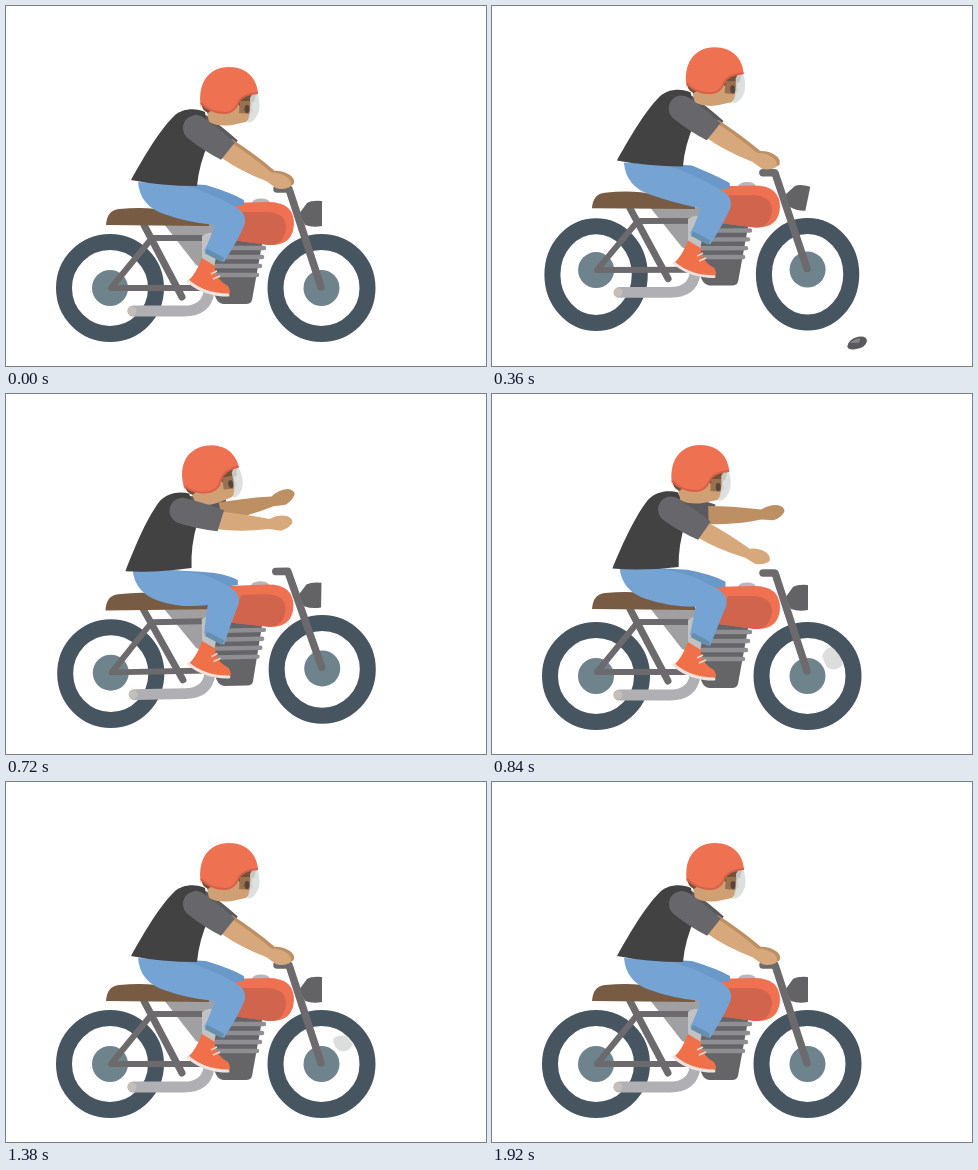
Write an HTML page that moves like this. It is 480 by 360 pixels and loops after 1.95 s.

```html
<!DOCTYPE html>
<html lang="en">
<head>
<meta charset="utf-8">
<title>Motorbike hop</title>
<style>
  html, body { margin: 0; width: 100%; height: 100%; overflow: hidden; background: #fff; }
  svg { display: block; width: 100vw; height: 100vh; }
</style>
</head>
<body>
<svg viewBox="0 0 480 360">
  <defs>
    <path id="forearm" d="M-3-9Q25-8 50-4Q58-9 67-8Q74-6 73-1Q69 5 62 7L50 6Q22 11-3 9Z"/>
    <path id="sleeve" d="M0-13Q22-13 40-11L39 11Q20 14 0 13A13 13 0 0 1 0-13Z"/>
  </defs>

  <g id="farArm">
    <use href="#sleeve" fill="#5a595e"/>
    <g class="fore" fill="#bd9064"><use href="#forearm"/></g>
  </g>

  <g id="glints" fill="#dcdddd">
    <path data-at="840" d="M330 262Q335 250 344 254Q352 263 350 272Q340 279 334 272Z"/>
    <path data-at="1050" d="M66 292Q90 309 116 317Q103 322 88 317Q70 309 66 292Z"/>
    <path data-at="1380" d="M327 257Q332 252 340 254L347 262Q343 271 334 269Q328 266 327 257Z"/>
  </g>

  <g id="wheels" fill="none" stroke="#475560" stroke-width="16"></g>

  <g id="bike">
    <path d="M158 218H214V270L190 259Z" fill="#a0a0a3"/>
    <path d="M127 305H178Q200 305 203 286" fill="none" stroke="#b0b0b4" stroke-width="11" stroke-linecap="round"/>
    <circle cx="126" cy="305" r="4.5" fill="#c5beb9"/>
    <path d="M206 233H257L246 294Q245 298 240 298H217Q210 297 208 286Z" fill="#656568"/>
    <path d="M206 242H258M207 251H256M208 260H254M209 269H251" stroke="#8f8f93" stroke-width="4.5" stroke-linecap="round"/>
    <g fill="none" stroke="#6c6a6d" stroke-linecap="round" stroke-linejoin="round">
      <path d="M200 282H105L146 232H212" stroke-width="6"/>
      <path d="M138 219L176 291" stroke-width="7"/>
    </g>
    <path d="M196 230Q208 222 213 234L208 262L196 254Z" fill="#c2c2c2"/>
    <path d="M100 219Q101 204 113 203Q142 200 162 205L203 213V220Z" fill="#775b43"/>
    <ellipse cx="255" cy="197" rx="9" ry="4.5" fill="#b7b7b7"/>
    <path d="M217 197L262 196Q288 196 288 218Q287 240 263 239L226 234Z" fill="#ef7151"/>
    <path d="M236 206H262Q280 207 280 222Q278 239 263 239L226 234Z" fill="#d0644d"/>
    <path id="lamp" fill="#636265" d="M293 208L301 197Q306 194 316 195V220Q307 222 299 219Z"/>
    <path d="M271 183H283L315 281" fill="none" stroke="#6c6a6d" stroke-width="7.5" stroke-linecap="round" stroke-linejoin="round"/>
  </g>

  <path id="farLeg" fill="#6a99c9"/>
  <path id="leg" fill="#75a4d4"/>
  <path id="cuff" fill="none" stroke="#668fae" stroke-width="5"/>
  <g id="shoe">
    <path d="M196 252L209 260Q208 272 222 280Q226 287 222 289Q212 291 200 286L182 275Q190 268 196 252Z" fill="#ef7049"/>
    <path d="M182 275Q198 289 222 289" fill="none" stroke="#eee3df" stroke-width="3" stroke-linecap="round"/>
    <path d="M205 268L211 265M207 273L214 270" stroke="#f7d9cd" stroke-width="1.5"/>
  </g>

  <g id="head">
    <path d="M198 92L203 116Q212 121 226 119L240 116Q245 112 244 107L247 105L243 88Z" fill="#d0a075"/>
    <path d="M195 95L206 104L202 107Q195 104 195 95Z" fill="#745239"/>
    <path d="M229 90Q242 84 250 88L248 96L233 100Z" fill="#745239"/>
    <path d="M234 95H246L244 108L233 107Z" fill="#997151"/>
    <ellipse cx="241" cy="103" rx="2.5" ry="4" fill="#58443b"/>
    <path d="M249 83Q255 92 253 105Q249 117 241 117Q245 105 244 92Z" fill="#d6dad9" opacity=".85"/>
    <path d="M195 102C191 78 202 61 223 61C241 61 251 73 252 87Q236 87 232 97Q230 107 219 108Q203 107 195 96Z" fill="#ee7151"/>
    <path d="M195 97Q204 107 219 107Q229 106 232 97Q236 88 252 87" fill="none" stroke="#d86149" stroke-width="2"/>
  </g>

  <path id="torso" fill="#424242" d="M125 174C135 156 152 126 168 110C177 102 190 102 199 106L203 136Q193 158 191 180Q155 180 125 174Z"/>

  <g id="nearArm">
    <g class="fore" fill="#d6a87c"><use href="#forearm"/></g>
    <use href="#sleeve" fill="#67666b"/>
  </g>

  <g id="rock">
    <path d="M-10 2Q-8-5 2-6Q11-6 10 0Q8 6-3 6Q-10 6-10 2Z" fill="#59585c"/>
    <path d="M-7-1Q-2-5 4-4L2 0Z" fill="#85838a"/>
  </g>
</svg>

<script>
const LOOP = 1950, STEP = 30;
const AXLE = { x: 104, y: 282 }, HIP = { x: 158, y: 177 };

const $ = id => document.getElementById(id);
const set = (el, attrs) => { for (const k in attrs) el.setAttribute(k, attrs[k]); };
const place = (el, x, y, a = 0, cx = 0, cy = 0) =>
  el.setAttribute("transform", `translate(${x} ${y}) rotate(${a} ${cx} ${cy})`);

const smooth = (t, from, to) => {
  const u = Math.min(1, Math.max(0, (t - from) / (to - from)));
  return u * u * (3 - 2 * u);
};
const pulse = (t, rise, full, fall, end) => smooth(t, rise, full) * (1 - smooth(t, fall, end));
// Ballistic arc from 0 up to 1 and back.
const arc = (t, from, to) => Math.max(0, 4 * (t - from) * (to - t) / (to - from) ** 2);

function turn(x, y, pivot, deg) {
  const a = deg * Math.PI / 180, c = Math.cos(a), s = Math.sin(a);
  const dx = x - pivot.x, dy = y - pivot.y;
  return [pivot.x + dx * c - dy * s, pivot.y + dx * s + dy * c];
}

function poseAt(t) {
  const air = arc(t, 215, 740);
  const wheelie = pulse(t, 330, 580, 610, 800);
  const rebound = 4 * pulse(t, 700, 820, 850, 1050);
  const back = pulse(t, 340, 580, 760, 1050);
  const reach = pulse(t, 380, 590, 600, 900);
  const farReach = pulse(t, 380, 590, 740, 1050);
  return {
    bikeX: 2 * wheelie, bikeY: -22.5 * air - rebound, tilt: -3 * wheelie,
    hang: rebound, stretch: 1.45 * air, squash: 1 - 0.025 * air - 0.027 * wheelie,
    hipX: -5.5 * back, hipY: -32 * arc(t, 276, 724) - 0.8 * rebound,
    lean: -8 * back, nod: -24 * pulse(t, 400, 580, 620, 800),
    near: [36 - 33 * reach, 31 - 43 * reach],
    far: [36 - 33 * farReach, 31 - 43 * farReach]
  };
}

const wheels = [104, 315.5].map(x => {
  const make = tag => $("wheels").appendChild(document.createElementNS("http://www.w3.org/2000/svg", tag));
  const tire = make("ellipse"), hub = make("circle");
  set(hub, { r: 18, fill: "#6e838c", stroke: "none" });
  return { x, tire, hub };
});

function drawArm(id, x, y, [upper, fore]) {
  const arm = $(id);
  place(arm, x, y, upper);
  place(arm.querySelector(".fore"), 38, 0, fore - upper);
}

function drawLegs(p, onBike) {
  const knee = onBike(238, 212), foot = onBike(208, 250);
  const shift = {
    h: [p.hipX, p.hipY],
    k: [knee[0] - 238 + p.hipX, knee[1] - 212 + p.hipX / 2],
    f: [foot[0] - 208, foot[1] - 250]
  };
  // Each point is tagged with the joint that carries it: hip, knee or foot.
  const path = text => text.replace(/([hkf])(\d+),(\d+)/g,
    (_, j, x, y) => `${+x + shift[j][0]} ${+y + shift[j][1]}`);
  $("farLeg").setAttribute("d", path("Mh165,177 Lh200,179 Qk226,187 k238,194 Lk238,199 Lk210,203Z"));
  $("leg").setAttribute("d", path("Mh132,176 Lh172,178 Qk200,184 k226,199 Qk243,207 k238,220 " +
    "Qk232,234 f218,256 Lf198,245 Qk206,230 k208,219 Qh180,216 h158,208 Qh134,200 h132,176Z"));
  $("cuff").setAttribute("d", path("Mf200,245 Lf217,254"));
}

function drawBike(p, onBike) {
  const body = `translate(${p.bikeX} ${p.bikeY}) rotate(${p.tilt} ${AXLE.x} ${AXLE.y}) ` +
    `translate(0 ${AXLE.y}) scale(1 ${p.squash}) translate(0 ${-AXLE.y})`;
  $("bike").setAttribute("transform", body);
  $("shoe").setAttribute("transform", body);
  place($("lamp"), 0, 0, 10 * p.stretch, 305, 208);
  for (const w of wheels) {
    const [x, y] = onBike(w.x, AXLE.y), hubY = y + p.hang;
    set(w.hub, { cx: x, cy: hubY });
    set(w.tire, { cx: x, cy: hubY + 4 * p.stretch, rx: 46 - 2 * p.stretch, ry: 46 + 2 * p.stretch });
  }
}

function drawRider(p, onBike) {
  drawLegs(p, onBike);
  place($("torso"), p.hipX, p.hipY, p.lean, HIP.x, HIP.y);
  const onTorso = (x, y) => {
    const [a, b] = turn(x, y, HIP, p.lean);
    return [a + p.hipX, b + p.hipY];
  };
  const [hx, hy] = onTorso(223, 90), [sx, sy] = onTorso(190, 122);
  place($("head"), hx - 223, hy - 90, p.nod, 223, 90);
  drawArm("farArm", sx + 3, sy - 2, p.far);
  drawArm("nearArm", sx, sy, p.near);
}

function drawRock(t) {
  const k = (t - 360) / STEP;
  place($("rock"), 365 - 46 * k - 0.7 * k * k, 337 + Math.min(6, Math.abs(k)), -8 - 25 * k);
  $("rock").style.display = k > -3 && k < 8 ? "" : "none";
}

function draw(t) {
  const p = poseAt(t);
  const onBike = (x, y) => {
    const [a, b] = turn(x, AXLE.y + (y - AXLE.y) * p.squash, AXLE, p.tilt);
    return [a + p.bikeX, b + p.bikeY];
  };
  drawBike(p, onBike);
  drawRider(p, onBike);
  drawRock(t);
  for (const g of $("glints").children)
    g.style.display = Math.abs(t - g.dataset.at) <= STEP ? "" : "none";
}

const start = performance.now();
function tick() {
  const t = (performance.now() - start) % LOOP;
  draw(Math.floor(t / STEP) * STEP);
  requestAnimationFrame(tick);
}
tick();
</script>
</body>
</html>
```
